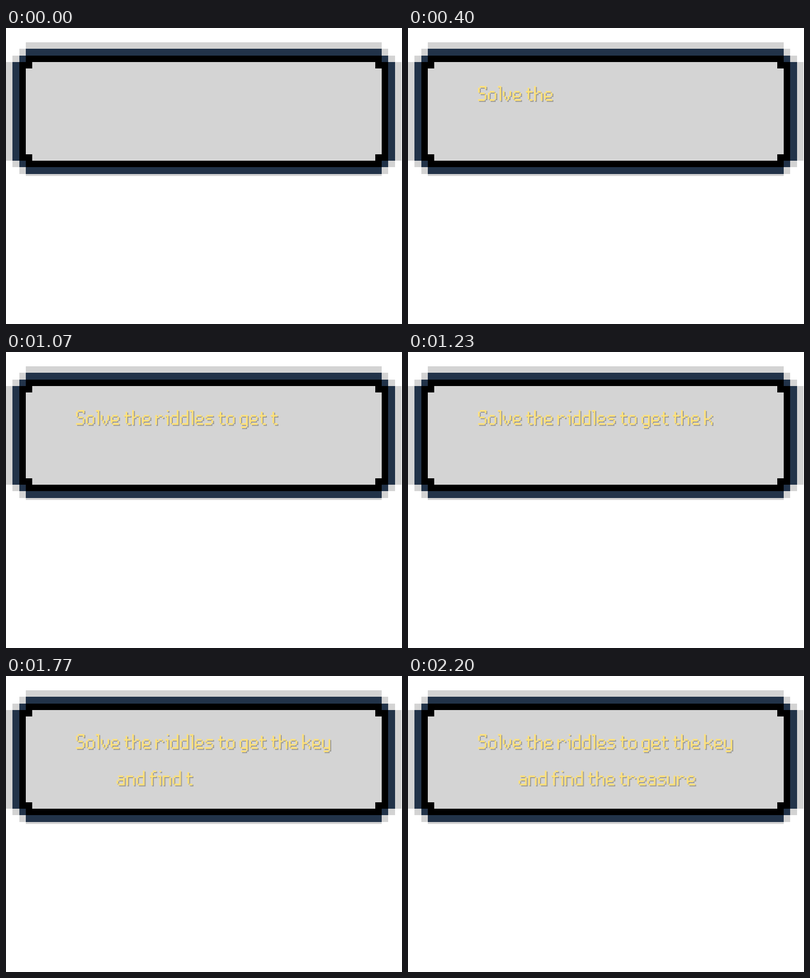
An HTML page for the animation above (4010 ms loop, 800 by 600 pixels).

```html
<!DOCTYPE html>
<html lang="en">
<head>
<meta charset="utf-8">
<title>Solve the riddles</title>
<style>
  html, body { margin: 0; width: 100%; height: 100%; overflow: hidden; background: #fff; }
  svg { display: block; width: 800px; height: 600px; }
  #frame { shape-rendering: crispEdges; }
  #text {
    fill: none;
    stroke: #fee17a;
    stroke-linecap: square;
    filter: drop-shadow(2px 2px 0 #999);
  }
</style>
</head>
<body>
<svg viewBox="0 0 800 600" role="img" aria-label="Solve the riddles to get the key and find the treasure">
  <clipPath id="panel"><rect width="800" height="300"/></clipPath>
  <g clip-path="url(#panel)">
    <g id="frame" transform="translate(0 29) scale(13.317 13.3333)"></g>
  </g>
  <g id="text"></g>
</svg>
<script>
const LOOP = 4010;
const TICK = 100 / 3;     // the picture is refreshed 30 times a second
const KEY_DELAY = 40;
const UNIT = 10 / 3;      // one pixel of the lettering

function add(parent, tag, attributes) {
  const el = document.createElementNS('http://www.w3.org/2000/svg', tag);
  for (const name in attributes) el.setAttribute(name, attributes[name]);
  return parent.appendChild(el);
}

// A panel layer with stepped corners is a stack of rects with x + y constant.
function layer(fill, firstX, lastX, sum) {
  for (let x = firstX; x <= lastX; x++) {
    const y = sum - x;
    add(frame, 'rect', { x, y, width: 60 - 2 * x, height: 21 - 2 * y, fill });
  }
}
const frame = document.getElementById('frame');
layer('#d3d3d3', 0, 3, 3);
layer('#223349', 1, 3, 4);
layer('#000', 2, 3, 5);
layer('#d4d4d4', 3, 4, 7);

// Letters are pen strokes on a grid: cap line 0, x-height 3, baseline 8.
const stem = 'M0 3v5';
const tall = 'M0 0v8';
const bowl = 'M1 3h2M0 4v3M1 8h2';
const tail = 'M4 3v6M1 10h2';
const arm = 'M1 4h0M2 3h1';
const glyphs = {
  S: 'M1 0h3v1M0 1v2M1 4h2M4 5v2M0 8h3',
  a: 'M1 3h2M4 4v4h-3M0 6v1M1 5h3',
  d: bowl + 'M4 0v8',
  e: 'M1 3h2M0 4v3M4 4v1M1 6h2M1 8h3',
  f: 'M2 0h1M1 1v7M0 3h3',
  g: bowl + tail,
  h: tall + arm + 'M4 4v4',
  i: 'M1 0h0M0 3h1v5',
  k: tall + 'M4 3h0M3 4h0M1 5h1M3 6h0M4 7v1',
  l: 'M0 0h1v8',
  n: stem + 'M0 3h3M4 4v4',
  o: bowl + 'M4 4v3',
  r: stem + arm + 'M4 4h0',
  s: 'M1 3h3M0 4h0M1 5h2M4 6v1M0 8h3',
  t: 'M1 1v6M0 3h3M2 8h1',
  u: 'M0 3v4M1 8h2M4 3v5',
  v: 'M0 3v2M4 3v2M1 6v1M3 6v1M2 8h0',
  y: 'M0 3v4M1 8h2' + tail
};
const widths = { i: 2, l: 2, f: 4, t: 4 };
const text = document.getElementById('text');
const letters = [];

function typeLine(line, x, y, start) {
  const group = add(text, 'g', { transform: `translate(${x} ${y}) scale(${UNIT})` });
  let column = 0.5;
  [...line].forEach((char, i) => {
    if (char === ' ') { column += 2; return; }
    const el = add(group, 'path', {
      d: glyphs[char], transform: `translate(${column} .5)`, visibility: 'hidden'
    });
    const tick = letters.length ? Math.ceil((start + KEY_DELAY * (i + 1)) / TICK) : 1;
    letters.push({ el, time: Math.round(tick * TICK / 10) * 10 });
    column += (widths[char] || 5) + 1;
  });
}
typeLine('Solve the riddles to get the key', 141.7, 117.7, 10);
typeLine('and find the treasure', 223.3, 191.7, 1357);

function draw() {
  const now = performance.now() % LOOP;
  for (const { el, time } of letters) {
    el.setAttribute('visibility', now >= time ? 'visible' : 'hidden');
  }
  requestAnimationFrame(draw);
}
draw();
</script>
</body>
</html>
```
